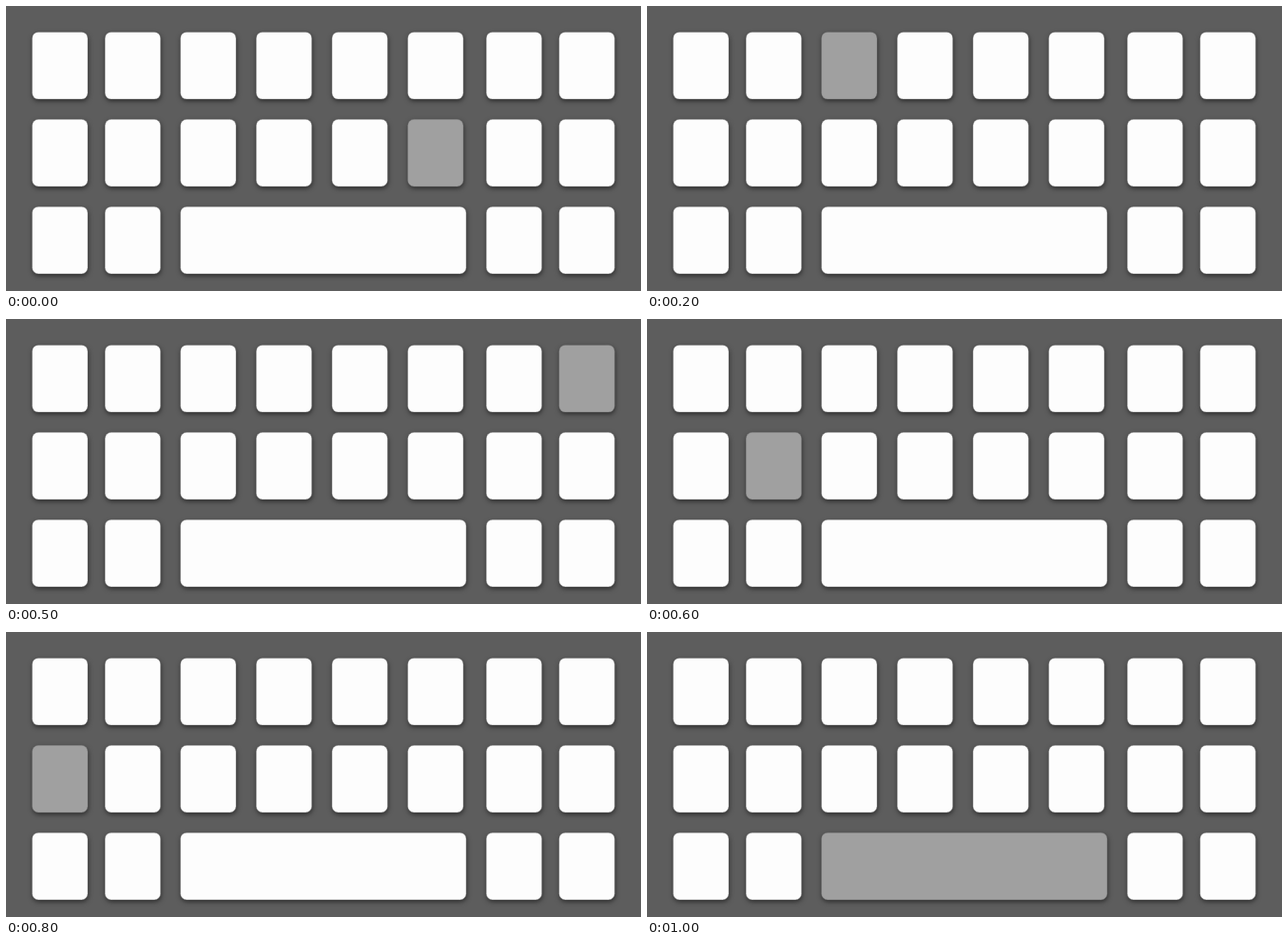
An HTML page with a canvas for the animation above (1100 ms loop, 668 px wide and 300 px high).

```html
<!DOCTYPE html>
<html lang="en">
<head>
<meta charset="utf-8">
<title>Keyboard</title>
<style>
  html, body { margin: 0; width: 100%; height: 100%; overflow: hidden; background: #5d5d5d; }
  canvas { display: block; }
</style>
</head>
<body>
<canvas id="stage" width="668" height="300"></canvas>
<script>
const ctx = document.getElementById('stage').getContext('2d');
const STEP = 100;
const KEY_W = 58.5, KEY_H = 70.7;
const layout = ['qwertyui', 'asdfghjk', 'zx    nm'];
const typed = 'huefgistam ';

// Two side pairs with a tighter pitch around a middle block of four
function keyX(col) {
  if (col < 2) return 27.5 + 76.6 * col;
  if (col < 6) return 183.5 + 79.7 * (col - 2);
  return 505.2 + 76.6 * (col - 6);
}

const keys = layout.flatMap((letters, row) =>
  [...letters].map((letter, col) => ({
    letter,
    x: keyX(col),
    y: 27.4 + 91.9 * row,
    w: letter === ' ' ? keyX(5) + KEY_W + 3 - keyX(2) : KEY_W
  })).filter((key, col) => key.letter !== ' ' || col === 2)
);

function drawKey({ x, y, w }, pressed) {
  ctx.save();
  ctx.shadowColor = 'rgba(0, 0, 0, 0.55)';
  ctx.shadowBlur = 5;
  ctx.shadowOffsetX = 0.5;
  ctx.shadowOffsetY = 2;
  ctx.fillStyle = pressed ? '#a0a0a0' : '#fdfdfd';
  ctx.beginPath();
  ctx.roundRect(x, y, w, KEY_H, 6.5);
  ctx.fill();
  ctx.restore();
  ctx.strokeStyle = 'rgba(110, 110, 110, 0.4)';
  ctx.stroke();
}

function draw(time) {
  const letter = typed[Math.floor(time / STEP) % typed.length];
  ctx.fillStyle = '#5d5d5d';
  ctx.fillRect(0, 0, 668, 300);
  for (const key of keys) drawKey(key, key.letter === letter);
}

let start;
function tick(now) {
  start ??= now;
  draw(now - start);
  requestAnimationFrame(tick);
}
draw(0);
requestAnimationFrame(tick);
</script>
</body>
</html>
```
